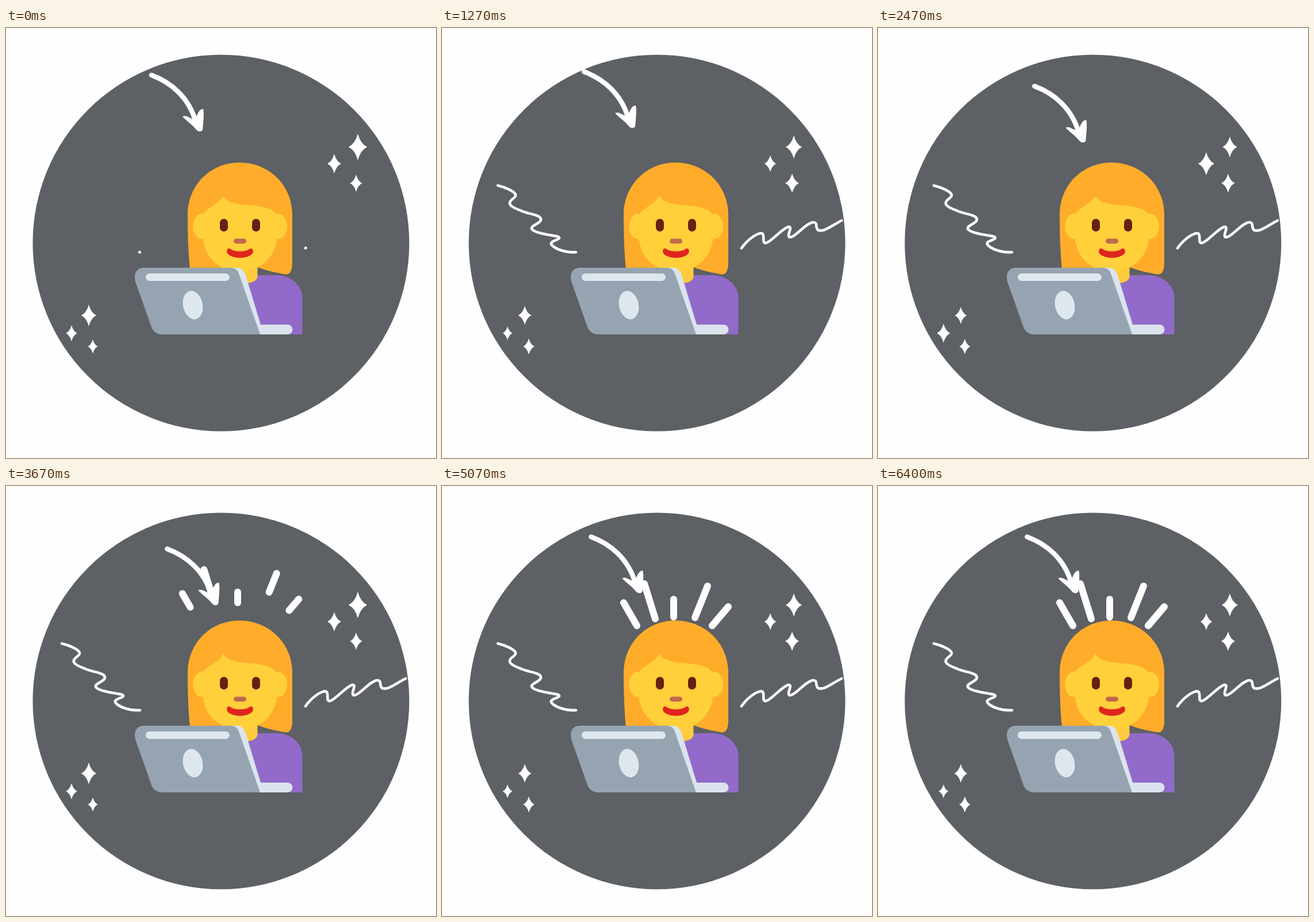
Animation of 748x748 px, one loop 6430 ms. Source, as an HTML page:

```html
<!DOCTYPE html>
<html lang="en">
<head>
<meta charset="utf-8">
<title>Working at a laptop</title>
<style>
  html, body { margin: 0; width: 100%; height: 100%; overflow: hidden; background: #fefefe; }
  svg { display: block; width: 100vw; height: 100vh; }
  .line { fill: none; stroke: #fff; stroke-linecap: round; stroke-linejoin: round; }
</style>
</head>
<body>
<svg viewBox="0 0 748 748">
  <circle cx="374" cy="374" r="327.5" fill="#5d6064"/>

  <g id="rays" class="line" stroke-width="12"></g>

  <g id="person">
    <path fill="#ffac2b" d="M320 420C317 390 316 360 316 325C316 273 356 234 406 234C457 234 498 273 498 325V408C498 424 493 431 483 428C466 425 450 421 437 416Z"/>
    <path fill="#926bca" d="M405 445C420 444 437 440 437 430H470C495 430 515.500 447 515.500 470V533H425Z"/>
    <path fill="#fecb3e" d="M376 405H437.500V432C437 441 426 444 415 444H376Z"/>
    <g fill="#ffd03a">
      <ellipse cx="340" cy="345" rx="14.500" ry="22"/>
      <ellipse cx="474" cy="345" rx="15" ry="22"/>
      <path d="M342 326C348 312 365 312 378 292C388 307 410 307 430 309C452 311 466 315 471 326C475 335 472 368 470 375C463 405 436 424 407 424C378 424 350 405 344 375C341 366 340 335 342 326Z"/>
    </g>
    <g fill="#662113">
      <rect x="372" y="332" width="14" height="22" rx="7"/>
      <rect x="428" y="332" width="14" height="22" rx="7"/>
    </g>
    <rect x="396" y="366.500" width="22" height="8.500" rx="4.200" fill="#c1694f"/>
    <path fill="#e0241f" d="M390 384C396 390 418 390 424 384C429 382 432 388 428 393C420 402 394 402 386 393C382 388 385 382 390 384Z"/>
  </g>

  <g id="laptop">
    <path fill="#dbe4ee" d="M385 417H400C409 417 414 421 417 430L443 516H490A8.500 8.500 0 0 1 490 533H436Z"/>
    <path fill="#95a4b0" d="M240 417H390C398 417 402 420 405 427L442 533H272C262 533 256 528 253 520L225 441C222 428 226 417 240 417Z"/>
    <rect x="243" y="427" width="146" height="13" rx="6.500" fill="#dfe7ee"/>
    <ellipse cx="325" cy="482" rx="17" ry="25" transform="rotate(-12 325 482)" fill="#dfe7ee"/>
  </g>

  <g id="arrow">
    <path class="line" stroke-width="8.500" d="M253 82C286 94 318 120 330 163"/>
    <path fill="#fff" d="M307 154C313 151 318 156 324 158L331 155C334 146 338 140 343 141C345 150 343 165 342 177C340 181 335 181 331 177C324 168 313 161 307 154Z"/>
  </g>

  <g id="squiggles" class="line" stroke-width="4.600">
    <path pathLength="1" d="M233 390C212 391 194 383 190 376C188 370 204 369 204 365C203 361 186 361 172 357C160 354 153 350 157 346C162 341 173 338 172 332C170 324 150 324 138 318C124 313 116 308 118 303C120 297 129 296 128 290C126 284 110 277 97 274"/>
    <path pathLength="1" d="M521 383C530 370 545 358 555 357C563 357 556 373 562 374C570 375 590 350 602 346C612 344 598 362 605 364C614 365 632 340 645 338C655 337 648 348 655 352C666 355 682 341 695 335"/>
  </g>

  <g id="sparkles" fill="#fff"></g>
</svg>
<script>
const LOOP = 6430, HOLD = 4950;
const BURST = 1480, SWAY = 1620, PULSE = 917;
const $ = id => document.getElementById(id);

function add(parent, tag, attrs = {}) {
  const el = document.createElementNS("http://www.w3.org/2000/svg", tag);
  for (const k in attrs) el.setAttribute(k, attrs[k]);
  return parent.appendChild(el);
}

// Piecewise linear value of ys over the stops xs
function ramp(x, xs, ys) {
  if (x <= xs[0]) return ys[0];
  for (let i = 1; i < xs.length; i++) {
    if (x <= xs[i]) {
      const u = (x - xs[i - 1]) / (xs[i] - xs[i - 1]);
      return ys[i - 1] + (ys[i] - ys[i - 1]) * u;
    }
  }
  return ys[ys.length - 1];
}

// Base and tip of each ray
const rays = [
  [339, 243, 316, 203], [371, 231, 352, 170], [403, 228, 403, 197],
  [440, 229, 462, 174], [470, 243, 498, 210]
].map(p => ({ p, el: add($("rays"), "line") }));

// Half height of each star over one pulse
const stops = [0, 0.385, 0.694, 0.937, 1];
const big = [23, 20, 18, 23, 23];
const mid = [17, 14.5, 20, 17, 17];
const low = [15, 17, 16.5, 19, 15];
const star = "M0-1Q.2-.25.7 0Q.2.25 0 1Q-.2.25-.7 0Q-.2-.25 0-1Z";
const sparkles = [
  [612, 207, 1, big], [571, 236, 1, mid], [609, 270, 1, low],
  [144, 500, 0.82, big], [114, 531, 0.82, mid], [151, 554, 0.82, low]
].map(([x, y, k, sizes]) => ({ x, y, k, sizes, el: add($("sparkles"), "path", { d: star }) }));

function drawRays(t) {
  const tip = ramp(t, [130, 470, 530, 710], [0, 1, 1, 1.4]);
  const tail = ramp(t, [520, 710, 850], [0, 0.8, 1.4]);
  $("rays").style.display = tip - tail > 0.01 ? "" : "none";
  for (const { p: [x, y, u, v], el } of rays) {
    el.setAttribute("x1", x + (u - x) * tail);
    el.setAttribute("y1", y + (v - y) * tail);
    el.setAttribute("x2", x + (u - x) * tip);
    el.setAttribute("y2", y + (v - y) * tip);
  }
}

function drawSquiggles(t) {
  const p = Math.min(1, t / 320);
  const g = $("squiggles");
  g.style.display = p > 0 && t < 1440 ? "" : "none";
  g.setAttribute("stroke-dasharray", p + " 2");
}

function drawArrow(t) {
  const s = Math.sin(Math.PI * (t + 260) / SWAY) ** 2;
  const eased = (s + s * s * (3 - 2 * s)) / 2;
  const d = 35 * eased - 6.5;
  $("arrow").setAttribute("transform", `translate(${d} ${d})`);
}

function drawSparkles(phase) {
  for (const { x, y, k, sizes, el } of sparkles) {
    const r = k * ramp(phase, stops, sizes);
    el.setAttribute("transform", `translate(${x} ${y}) scale(${r})`);
  }
}

const start = performance.now();
function frame() {
  const t = Math.min((performance.now() - start) % LOOP, HOLD);
  drawRays(t % BURST);
  drawSquiggles(t % BURST);
  drawArrow(t);
  drawSparkles(t % PULSE / PULSE);
  requestAnimationFrame(frame);
}
frame();
</script>
</body>
</html>
```
